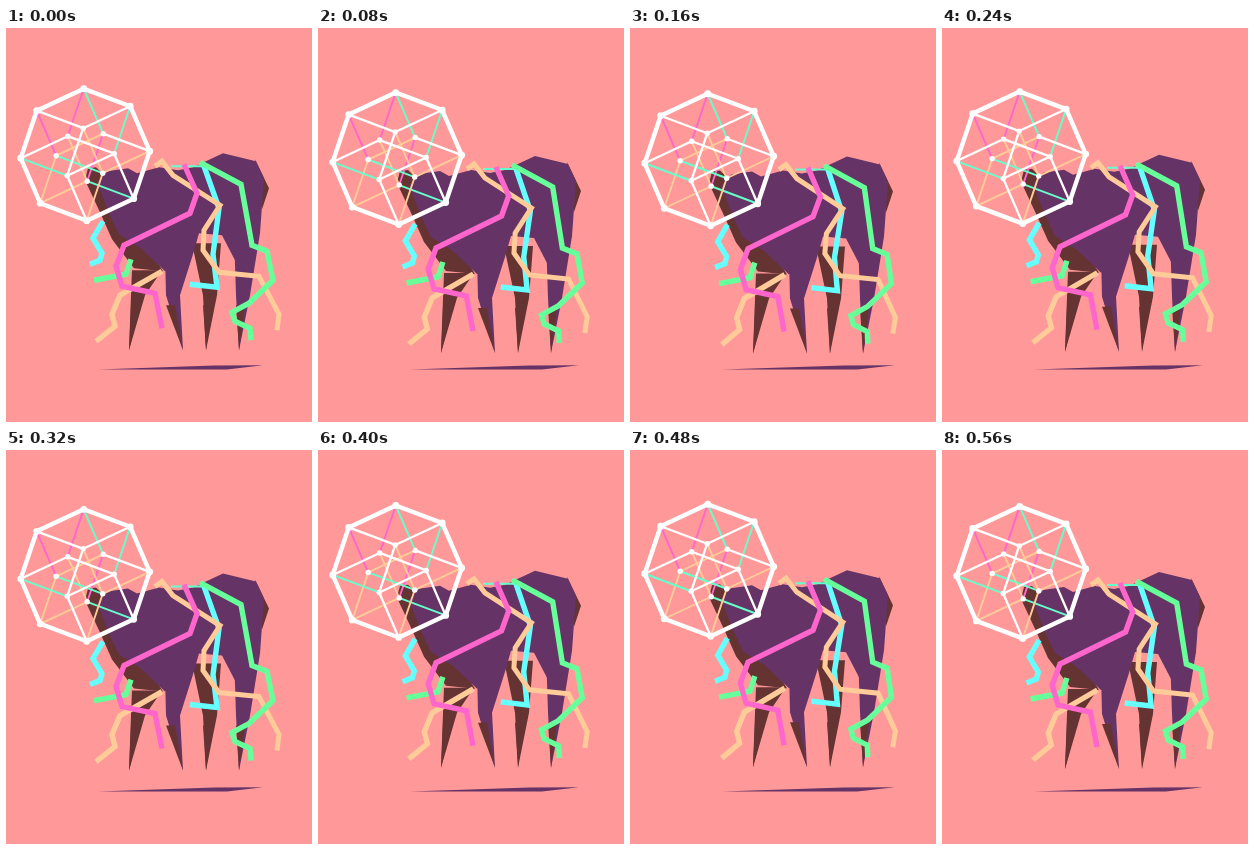
An HTML page that plays this animation: 306 px wide and 394 px high, repeating every 0.64 s.

```html
<!DOCTYPE html>
<html lang="en">
<head>
<meta charset="utf-8">
<title>Tesseract beast</title>
<style>
html, body { margin: 0; width: 100%; height: 100%; overflow: hidden; background: #f99; }
svg { display: block; width: 100vw; height: 100vh; }
</style>
</head>
<body>
<svg viewBox="0 0 306 394">
  <path id="shadow" fill="#636" d="M92 341.5L208 337.6L257 337.2L221 341.5Z"/>
  <g id="beast">
    <g id="farLegs"/>
    <path fill="#633" d="M79 152L82 140L90 139L98 147L157 243L128 240L106 211L94 184ZM249 131L263 160L256 181Z"/>
    <path fill="#636" d="M91 154L101 143L122 140L131 145L153 139L172 142L187 139L217 125L250 133L258 150L254 205L229 232L216 207L193 205L187 226L159 243L135 220L113 206L103 185Z"/>
    <g id="nearLegs"/>
    <g id="ribbons" fill="none" stroke-width="5.4"/>
  </g>
  <g id="cube" fill="#fff" stroke-linecap="round"/>
</svg>
<script>
const NS = 'http://www.w3.org/2000/svg';
const LOOP = 640, STEP = 80;
const PURPLE = '#663366', BROWN = '#663333', WHITE = '#fff';
const GREEN = '#66ff99', CYAN = '#66ffff', TEAL = '#66ffcc', PINK = '#ff66cc', PEACH = '#ffcc99';
const $ = id => document.getElementById(id);

function add(parent, tag, attrs) {
  const el = $(parent).appendChild(document.createElementNS(NS, tag));
  for (const key in attrs) el.setAttribute(key, attrs[key]);
  return el;
}

const place = (id, x, y) => $(id).setAttribute('transform', `translate(${x} ${y})`);

// A leg tapers from the hip to the knee and from there to a point.
function leg(group, fill, left, right, hip, knee, foot) {
  const kneeY = 267, footY = 322, half = 7;
  const tip = `${foot} ${footY} ${knee + half} ${kneeY}`;
  add(group, 'polygon', { fill, points: `${left} ${hip} ${knee - half} ${kneeY} ${tip} ${right} ${hip}` });
  add(group, 'polygon', { fill: BROWN, points: `${knee - half} ${kneeY + 10} ${foot} ${footY} ${knee + 2} ${kneeY + 10}` });
}

leg('farLegs', BROWN, 126, 156, 242, 132, 123);
leg('farLegs', BROWN, 186, 215, 215, 204, 200);
leg('nearLegs', PURPLE, 159, 187, 226, 167, 177);
leg('nearLegs', PURPLE, 228, 254, 205, 237, 233);

function ribbon(stroke, path, width = 5.4) {
  const points = path.split(' ').map(p => p.split(',').map(Number));
  return { el: add('ribbons', 'polyline', { stroke, 'stroke-width': width }), points };
}

const ribbons = [
  ribbon(CYAN, '97,193 87,210 96,225 94,232 84,236'),
  ribbon(GREEN, '125,231 120,246 88,252'),
  ribbon(TEAL, '165,138 200,138', 2),
  ribbon(CYAN, '197,135 213,180 207,226 211,259 184,256'),
  ribbon(PEACH, '149,138 156,133 167,147 214,177 198,202 197,222 213,244 253,248 273,286 271,302', 5),
  ribbon(PEACH, '156,243 114,267 106,286 109,298 90,313'),
  ribbon(PINK, '178,136 191,165 184,185 118,217 110,238 116,258 149,265 156,300'),
  ribbon(GREEN, '194,134 235,156 246,217 261,223 267,252 243,275 226,284 229,293 244,300 245,312')
];

// Tesseract: each corner is the top point plus a subset of four axes.
const top4 = [78, 61];
const axes = { 1: [46.5, 17.5], 2: [19.5, 45], 3: [-16, 47.5], 4: [-47, 22] };
const rim = ['', '1', '12', '123', '1234', '234', '34', '4'];

function corner(key) {
  return [...key].reduce(([x, y], k) => [x + axes[k][0], y + axes[k][1]], top4);
}

// Edge colour from its axis and the corner it starts at.
const edgeColor = {
  1: from => from.length === 2 ? TEAL : WHITE,
  2: from => from === '' ? TEAL : from === '4' ? PINK : /13/.test(from) ? WHITE : PEACH,
  3: from => from === '14' ? WHITE : from === '1' ? TEAL : /4/.test(from) ? PEACH : PINK,
  4: from => /2/.test(from) ? PEACH : WHITE
};

const keys = Array.from({ length: 16 }, (_, bits) => [...'1234'].filter((k, i) => bits >> i & 1).join(''));
const edges = [];
for (const from of keys) {
  for (const axis of '1234') {
    if (from.includes(axis)) continue;
    const to = [...from, axis].sort().join('');
    const outer = rim.includes(from) && rim.includes(to);
    edges.push({ from, to, outer, stroke: outer ? WHITE : edgeColor[axis](from) });
  }
}
edges.sort((a, b) => (a.stroke === WHITE) - (b.stroke === WHITE));
for (const { from, to, outer, stroke } of edges) {
  const [x1, y1] = corner(from), [x2, y2] = corner(to);
  const width = outer ? 4.4 : stroke === WHITE ? 2.3 : 1.9;
  add('cube', 'line', { x1, y1, x2, y2, stroke, 'stroke-width': width });
}
for (const key of keys) {
  const [cx, cy] = corner(key);
  add('cube', 'circle', { cx, cy, r: rim.includes(key) ? 3.4 : 2.7 });
}

function render(time) {
  const t = Math.floor(time % LOOP / STEP) * STEP;
  const phase = 2 * Math.PI * t / LOOP;
  const sway = Math.cos(2 * phase) - 1;

  place('beast', 0, 4.3 * Math.sin(phase + 0.2) - 0.6);
  place('cube', -0.3, 5.8 * Math.sin(phase + 0.12) - 1);
  $('shadow').setAttribute('transform', `translate(92 0) scale(${1 - 0.024 * sway} 1) translate(-92 0)`);

  // Loose ends swing more the lower they hang.
  for (const { el, points } of ribbons) {
    el.setAttribute('points', points.map(([x, y]) => {
      const depth = Math.max(0, (y - 140) / 160);
      return [x + (x - 120) * 0.027 * depth * sway, y];
    }).join(' '));
  }
}

function tick() {
  render(performance.now());
  requestAnimationFrame(tick);
}
tick();
</script>
</body>
</html>
```
